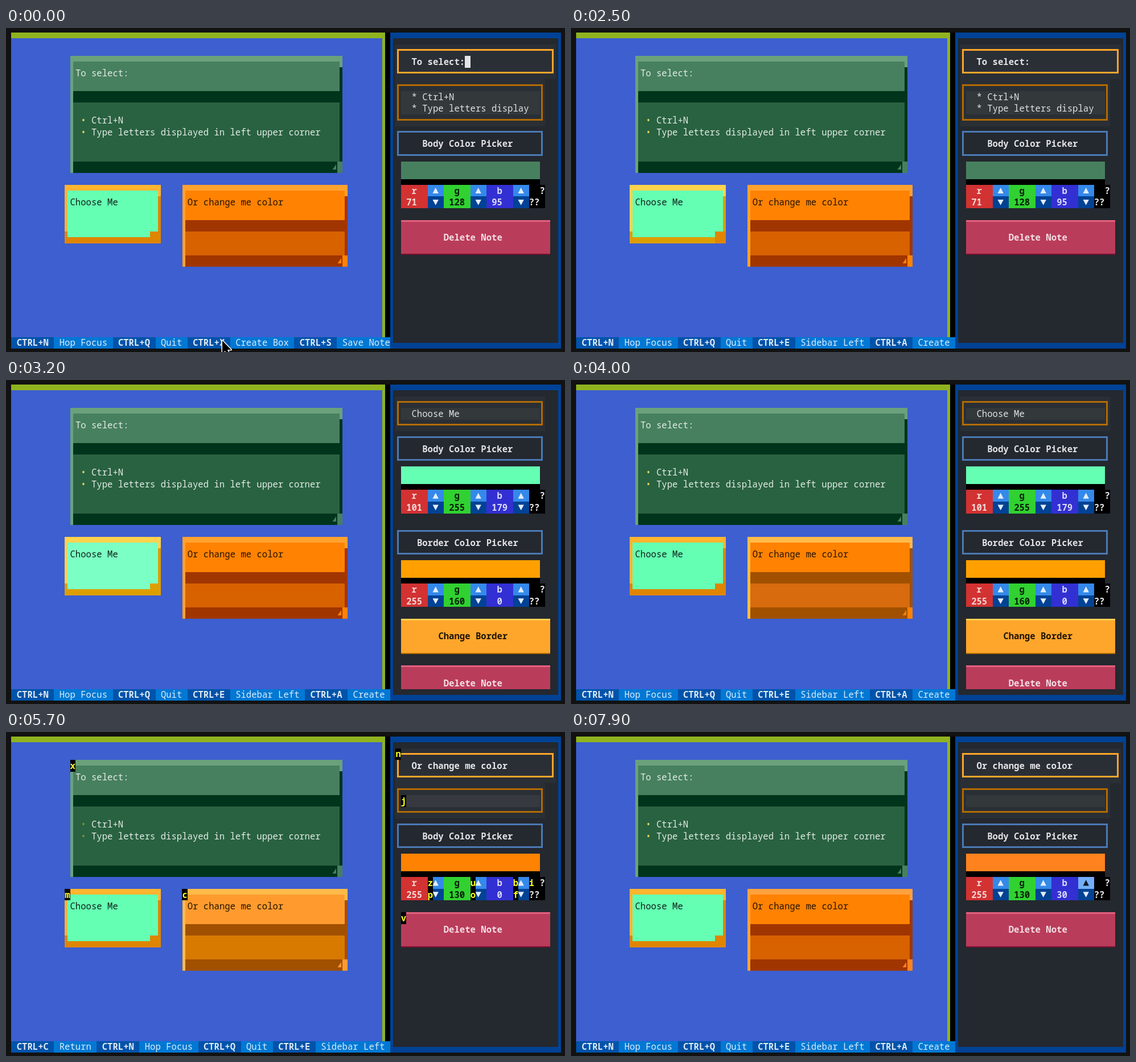
An HTML page with a canvas that plays this animation: 982 px wide and 570 px high, repeating every 8 s.

```html
<!DOCTYPE html>
<html lang="en">
<head>
<meta charset="utf-8">
<style>
html, body { margin: 0; width: 100%; height: 100%; overflow: hidden; background: #121212; }
canvas { display: block; }
</style>
</head>
<body>
<canvas id="stage" width="982" height="570"></canvas>
<script>
const ctx = document.getElementById('stage').getContext('2d');
const LOOP = 8000, CELL_W = 9.375, CELL_H = 20.6;
const colX = c => c * CELL_W;
const rowY = r => 8 + r * CELL_H;
const within = (t, a, b) => t >= a && t < b;

// Rectangle given by its edges in pixels
function box(x0, y0, x1, y1, color) {
  const [l, t, r, b] = [x0, y0, x1, y1].map(Math.round);
  ctx.fillStyle = color;
  ctx.fillRect(l, t, r - l, b - t);
}

// Rectangle given by its edges in terminal cells
const cells = (c0, r0, c1, r1, color) => box(colX(c0), rowY(r0), colX(c1), rowY(r1), color);

function text(str, col, row, color, bold = false) {
  ctx.font = `${bold ? 'bold ' : ''}15.625px "Noto Sans Mono", monospace`;
  ctx.fillStyle = color;
  ctx.fillText(str, colX(col), rowY(row) + 15.8);
}

function poly(points, color) {
  ctx.beginPath();
  points.forEach(([x, y]) => ctx.lineTo(x, y));
  ctx.closePath();
  ctx.fillStyle = color;
  ctx.fill();
}

function mix(a, b, k) {
  return `rgb(${a.map((v, i) => Math.round(v + (b[i] - v) * k))})`;
}

function outline(c0, row, c1, rows, color) {
  const x = Math.round(colX(c0)) + 3, y = Math.round(rowY(row) + 8.4);
  const right = Math.round(colX(c1)), bottom = Math.round(rowY(row + rows - 1) + 10.5);
  ctx.strokeStyle = color;
  ctx.lineWidth = 3;
  ctx.strokeRect(x + 1.5, y + 1.5, right - x - 3, bottom - y - 3);
}

// Board -------------------------------------------------------------

// Note with a title, a divider, a body and a resize grip
function note(x0, y0, x1, y1, split, col, title, p) {
  const l = x0 + 4.5, r = x1 - 4.6, foot = y1 - 20;
  box(x0, y0, x1, y1, p.light);
  box(l, y0 + 20, x1, y1, p.dark);
  box(l, y0 + 10, r, split, p.title);
  box(l, split + 20, r, foot, p.body);
  box(x1 - 9, foot, x1, y1, p.grip);
  poly([[x1 - 17.5, foot + 14], [x1 - 11, foot + 5], [x1 - 11, foot + 14]], p.grip);
  text(title, col, (y0 + 20.6 - 8) / CELL_H, p.ink);
}

function greenNote(jumping) {
  note(113, 49, 591, 255, 111, 13, 'To select:', {
    light: '#6aa17c', dark: '#00341b', title: '#47805f', body: '#296241', grip: '#47805f', ink: '#e3ece6'
  });
  const bullet = jumping ? '#83912f' : '#e6d65a';
  ['Ctrl+N', 'Type letters displayed in left upper corner'].forEach((line, i) => {
    text('•', 14, 7 + i, bullet);
    text(line, 16, 7 + i, '#e3ece6');
  });
}

function mintNote(t) {
  const lit = within(t, 2500, 4000);
  const light = lit ? '#ffd34d' : '#ffb52e', dark = lit ? '#de9e00' : '#e08500';
  const pulse = lit ? Math.max(0, Math.min(7, Math.floor((t - 2700) / 100))) / 7 : 0;
  box(103, 276, 272, 379, dark);
  box(103, 276, 272, 296, light);
  box(103, 276, 108, 358, light);
  box(108, 286, 267, 368, mix([101, 255, 179], [133, 255, 203], pulse));
  box(253, 358, 272, 379, t < 2600 ? '#e08500' : dark);
  text('Choose Me', 12, 14, '#10231a');
}

function orangeNote(t, blue) {
  const lit = within(t, 4000, 7000);
  const pulse = lit ? Math.max(0, Math.min(7, Math.floor((t - 4200) / 100))) / 7 : 0;
  note(310, 276, 600, 420, 338, 34, 'Or change me color', {
    light: lit ? '#ffbb4a' : `rgb(255,162,${46 + blue / 2})`,
    dark: lit ? '#a15000' : '#a13500',
    title: mix([255, 130, 2], [255, 155, 46], pulse),
    body: !lit ? '#d86100' : t < 5700 ? '#d76b0d' : '#d87a00',
    grip: lit && t >= 4100 ? '#ff9a35' : `rgb(255,130,${Math.max(2, blue)})`,
    ink: '#251304'
  });
}

// Sidebar -----------------------------------------------------------

let hints = [];
const hint = (letter, col, row) => hints.push([letter, col, row]);

function titleInput(value, cursorOn) {
  cells(73, 1, 103, 4, '#2a2f36');
  outline(73, 1, 102.6, 3, '#fea62b');
  text(value, 76, 2, '#e3e4e6', true);
  if (cursorOn) cells(86, 2, 87, 3, '#e4e4e4');
  hint('n', 73, 1);
}

function textArea(row, lines, jumping) {
  const rows = lines.length + 2;
  cells(73, row, 101, row + rows, '#2a2f35');
  outline(73, row, 100.6, rows, '#b36b00');
  cells(74, row + 1, 100, row + rows - 1, jumping ? '#36393f' : '#33383b');
  lines.forEach((line, i) => text(line, 76, row + 1 + i, '#e0e1e2'));
  hint('j', 74, row + 1);
}

function arrow(col, row, up, hot) {
  cells(col, row, col + 3, row + 1, up ? (hot ? '#73aefa' : '#3489ea') : '#014295');
  const x = colX(col + 1.5), y = rowY(row);
  const [tip, base] = up ? [5, 15.3] : [15.3, 5.5];
  poly([[x, y + tip], [x + 5.2, y + base], [x - 5.2, y + base]], hot ? '#101820' : '#e2edfb');
}

function picker(row, label, labelCol, rgb, keys, hot) {
  outline(73, row, 100.6, 3, '#4a7ab5');
  text(label, labelCol, row + 1, '#e2e3e5', true);
  cells(74, row + 3, 100, row + 4.5, `rgb(${rgb})`);
  cells(74, row + 4.5, 100, row + 5, '#000');
  const top = row + 5;
  const styles = [['r', '#d23232', '#f3d6d6'], ['g', '#31d131', '#062006'], ['b', '#3230d2', '#dad9f6']];
  styles.forEach(([name, bg, ink], i) => {
    const col = 74 + i * 8, value = String(rgb[i]);
    cells(col, top, col + 5, top + 2, bg);
    text(name, col + 2, top, ink, true);
    text(value, col + Math.floor((5 - value.length) / 2), top + 1, ink, true);
    arrow(col + 5, top, true, hot && name === 'b');
    arrow(col + 5, top + 1, false, false);
    hint(keys[i * 2], col + 5, top);
    hint(keys[i * 2 + 1], col + 5, top + 1);
  });
  cells(98, top, 101, top + 2, '#000');
  text('?', 100, top, '#e8e8e8', true);
  text('??', 98, top + 1, '#e8e8e8', true);
  hint(keys[6], 98, top);
}

function button(row, label, col, key, [face, high, low, ink]) {
  cells(74, row, 102, row + 3, face);
  const x0 = colX(74), x1 = colX(102), y0 = Math.round(rowY(row)), y1 = Math.round(rowY(row + 3));
  box(x0, y0, x1, y0 + 3, high);
  box(x0, y1 - 2, x1, y1, low);
  text(label, col, row + 1, ink, true);
  hint(key, 74, row);
}

function sidebar(t, jumping, blue) {
  const bodyKeys = 'zpuobfi';
  const deleteNote = row =>
    button(row, 'Delete Note', 82, 'v', ['#ba3c5b', '#e4607f', '#7d1130', '#f3dfe4']);

  box(675, 8, 975, 564, '#004295');
  box(680, 18, 970, 554, '#24282f');
  ctx.save();
  ctx.beginPath();
  ctx.rect(680, 18, 290, 526);
  ctx.clip();
  if (t < 2600) {
    const cursorOn = t < 500 || within(t, 900, 1500) || within(t, 2000, 2500);
    titleInput('To select:', cursorOn);
    textArea(4, ['* Ctrl+N', '* Type letters display'], jumping);
    picker(8, 'Body Color Picker', 78, [71, 128, 95], bodyKeys);
    deleteNote(16);
  } else if (t < 4100) {
    textArea(1, ['Choose Me'], jumping);
    picker(4, 'Body Color Picker', 78, [101, 255, 179], bodyKeys);
    picker(12, 'Border Color Picker', 77, [255, 160, 0], 'aswqrtg');
    button(20, 'Change Border', 81, 'e', ['#fea62b', '#ffd050', '#b87400', '#201505']);
    deleteNote(24);
  } else {
    titleInput('Or change me color', false);
    textArea(4, [''], jumping);
    picker(7, 'Body Color Picker', 78, [255, 130, blue], bodyKeys, t >= 7000);
    deleteNote(15);
  }
  ctx.restore();
}

// Footer ------------------------------------------------------------

const SHARED = ['CTRL+N', 'Hop Focus', 'CTRL+Q', 'Quit'];
const EDITING = [...SHARED, 'CTRL+X', 'Create Box', 'CTRL+S', 'Save Note'];
const BROWSING = [...SHARED, 'CTRL+E', 'Sidebar Left', 'CTRL+A', 'Create'];
const JUMPING = ['CTRL+C', 'Return', ...SHARED, 'CTRL+E', 'Sidebar Left'];

function footer(t, jumping) {
  const items = jumping ? JUMPING : t < 1200 ? EDITING : BROWSING;
  const hovered = within(t, 100, 1200) ? 2 : -1;
  let col = 1;
  cells(1, 26, 72, 27, '#0178d4');
  items.forEach((label, i) => {
    const isKey = i % 2 === 0, hot = i >> 1 === hovered;
    const end = Math.min(72, col + label.length + 2);
    cells(col, 26, end, 27, isKey ? (hot ? '#004295' : '#0053aa') : (hot ? '#006ac5' : '#0178d4'));
    text(label, col + 1, 26, isKey ? '#e0eaf5' : '#dcedfa', isKey);
    col = end;
  });
}

function pointer() {
  ctx.beginPath();
  [[380, 550], [380, 573], [385, 568], [389, 577], [393, 575], [389, 566], [395.5, 566]]
    .forEach(([x, y]) => ctx.lineTo(x, y));
  ctx.closePath();
  ctx.lineJoin = 'round';
  ctx.lineWidth = 3;
  ctx.strokeStyle = '#fff';
  ctx.stroke();
  ctx.fillStyle = '#000';
  ctx.fill();
  ctx.lineJoin = 'miter';
}

function draw(t) {
  const jumping = within(t, 1200, 2500) || within(t, 3400, 4000) || within(t, 5700, 7000);
  const step = Math.floor((t - 7300) / 100);
  const blue = t < 7400 ? 0 : t >= 7900 ? 30 : Math.min(step, 4) * 5;

  hints = [['x', 12, 2], ['m', 11, 13], ['c', 33, 13]];
  box(0, 0, 982, 570, '#121212');
  box(9, 8, 675, 544, '#000');
  box(9, 8, 666, 544, '#8fb31f');
  box(9, 18, 661, 544, '#3d5fd0');
  greenNote(jumping);
  mintNote(t);
  orangeNote(t, blue);
  sidebar(t, jumping, blue);
  footer(t, jumping);
  if (jumping) {
    for (const [letter, col, row] of hints) {
      cells(col, row, col + 1, row + 1, '#000');
      text(letter, col, row, '#ffff20', true);
    }
  }
  if (t < 100) pointer();
}

const start = performance.now();
function frame() {
  draw((performance.now() - start) % LOOP);
  requestAnimationFrame(frame);
}
frame();
</script>
</body>
</html>
```
